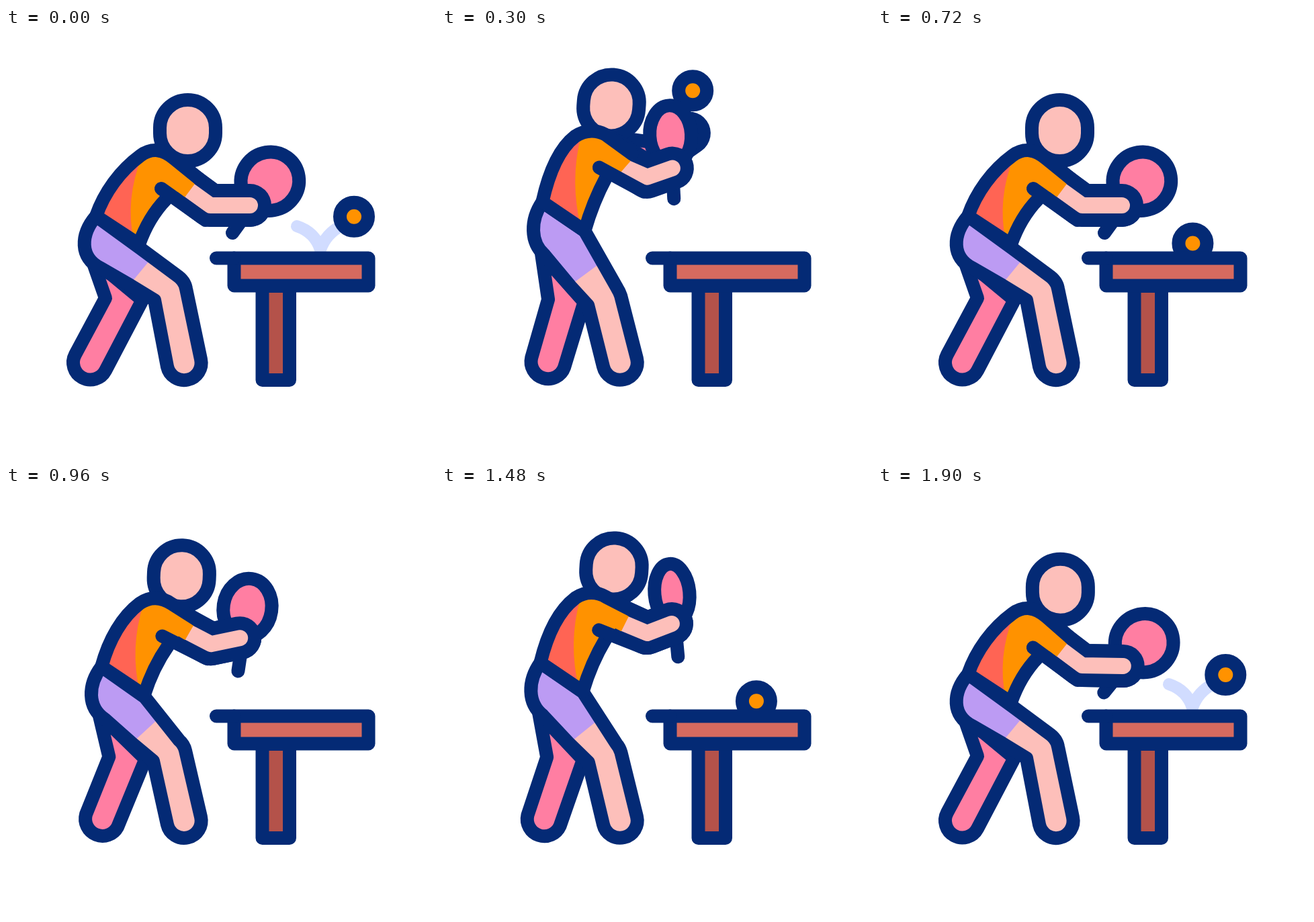
An HTML page with a canvas that plays this animation: 640 by 640 pixels, repeating every 1.92 s.

```html
<!DOCTYPE html>
<html lang="en">
<head>
<meta charset="utf-8">
<title>Table tennis</title>
<style>
html, body { margin: 0; width: 100%; height: 100%; overflow: hidden; background: #fff; }
canvas { display: block; width: 100vmin; height: 100vmin; }
</style>
</head>
<body>
<canvas width="640" height="640"></canvas>
<script>
const c = document.querySelector('canvas').getContext('2d');
const LOOP = 1920;
const NAVY = '#042a75', SKIN = '#fdbfba', PINK = '#ff7ea2', ORANGE = '#ff9200', RED = '#ff6454',
  PURPLE = '#bc9bf3', TABLE = '#d66a5f', LEG = '#b4524a', TRAIL = '#d1dcff';

// Tracks: [time, value]. 0 is the stroke pose, 1 the upright pose.
const BODY = [[0, 0], [300, .95], [400, 1.05], [560, .55], [640, 0], [720, 0], [960, .47], [1080, .9],
  [1160, 1], [1260, 1.08], [1480, .75], [1640, -.03], [1720, -.06], [1900, -.045], [1920, 0]];
const ARM = [[0, 0], [300, .69], [420, 1], [560, .55], [640, 0], [720, 0], [960, .47], [1080, .9],
  [1160, 1], [1260, 1.08], [1480, .74], [1640, -.03], [1720, -.06], [1900, -.05], [1920, 0]];
const FACE = [[0, 33], [300, 21], [420, 17], [560, 26], [640, 33], [720, 33], [960, 26],
  [1160, 17], [1480, 16], [1640, 33], [1920, 33]];
const TOSS = [[0, 0], [120, 0], [300, 1], [400, .9], [560, 0], [1920, 0]];

// Monotone cubic interpolation
function track(keys, t) {
  let i = 0;
  while (i < keys.length - 2 && t >= keys[i + 1][0]) i++;
  const slope = j => j < 0 || j > keys.length - 2 ? 0
    : (keys[j + 1][1] - keys[j][1]) / (keys[j + 1][0] - keys[j][0]);
  const tangent = j => {
    const p = slope(j - 1), q = slope(j);
    return p * q > 0 ? 2 * p * q / (p + q) : 0;
  };
  const [t0, v0] = keys[i], [t1, v1] = keys[i + 1];
  const d = t1 - t0, u = (t - t0) / d, w = 1 - u;
  return v0 * (1 + 2 * u) * w * w + tangent(i) * d * u * w * w
    + v1 * u * u * (3 - 2 * u) - tangent(i + 1) * d * u * u * w;
}

const lerp = (a, b, k) => a + (b - a) * k;
const clamp = v => Math.max(0, Math.min(1, v));
const bow = k => k * (1 - k);
const point = (ax, ay, bx, by, k) => [lerp(ax, bx, k), lerp(ay, by, k)];

// Blends two path strings of equal structure
function morph(a, b, k) {
  const to = b.match(/[\d.]+/g);
  let i = 0;
  return new Path2D(a.replace(/[\d.]+/g, n => ' ' + lerp(+n, +to[i++], k)));
}

function fill(path, color) {
  c.fillStyle = color;
  c.fill(path);
}

function stroke(path, color = NAVY, width = 20, cap = 'round') {
  c.strokeStyle = color;
  c.lineWidth = width;
  c.lineCap = cap;
  c.lineJoin = 'round';
  c.stroke(path);
}

function line(...points) {
  const p = new Path2D();
  points.forEach(q => p.lineTo(...q));
  return p;
}

function outlined(path, color) {
  fill(path, color);
  stroke(path);
}

function curve(x0, y0, x1, y1, x2, y2, u) {
  const w = 1 - u, f = (a, b, d) => a * w * w + 2 * b * u * w + d * u * u;
  return [f(x0, x1, x2), f(y0, y1, y2)];
}

// Ball position and opacity
function ballAt(t) {
  const arc = (x, alpha = 1) => [x, 278 + 43 * ((535 - x) / 67) ** 2, alpha];
  if (t < 140) return arc(518 + 50 * (t / 140) ** 2, clamp((150 - t) / 30));
  if (t < 190) return null;
  if (t < 580) return [368 + 64 * ((t - 190) / 390) ** 2, 65 + .004 * (t - 385) ** 2, 1];
  if (t < 720) return [...curve(432, 217, 460, 245, 468, 321, (t - 580) / 140), 1];
  if (t < 940) return arc(468 + .42 * (t - 720), clamp((950 - t) / 40));
  if (t < 1300) return null;
  if (t < 1480) return arc(468 + .59 * (1480 - t), clamp((t - 1290) / 30));
  if (t < 1620) return [...curve(468, 321, 462, 260, 440, 235, (t - 1480) / 140), 1];
  if (t < 1760) return [...curve(440, 235, 462, 255, 468, 321, (t - 1620) / 140), 1];
  return arc(518 - 50 * (1 - (t - 1760) / 160) ** 2);
}

function drawBall(t) {
  c.globalAlpha = t < 960 ? clamp(1 - t / 120) : clamp((t - 1760) / 110);
  stroke(new Path2D('M433 295Q460 304 468 330Q476 306 500 294'), TRAIL, 18);
  const ball = ballAt(t);
  if (ball) {
    const p = new Path2D();
    p.arc(ball[0], ball[1], 21, 0, 7);
    c.globalAlpha = ball[2];
    outlined(p, ORANGE);
  }
  c.globalAlpha = 1;
}

function drawTable() {
  outlined(new Path2D('M381.5 384H422V524H381.5Z'), LEG);
  outlined(new Path2D('M339.5 342.5H539.5V383.5H339.5Z'), TABLE);
  stroke(line([313, 342.5], [339.5, 342.5]));
}

function drawRacket(a, toss, width) {
  const [x, y] = point(337, 305, 358, 230, a);
  c.save();
  c.translate(x - 6 * bow(a) - 5 * toss, y + 24 * bow(a) - 4 * toss);
  c.rotate((36 - 54 * a - 8 * bow(a)) * Math.PI / 180);
  stroke(line([0, 0], [0, -70]));
  const face = new Path2D();
  face.ellipse(0, -95, width + 10, 44, 0, 0, 7);
  outlined(face, PINK);
  c.restore();
}

function drawLegs(k) {
  outlined(morph(
    'M127 342L148 402L103 486A25.5 25.5 0 0 0 148 510L203 405Z',
    'M149 336L158.5 404L134.5 491A25.5 25.5 0 0 0 183.5 505L212 408Z', k), PINK);
  const leg = morph(
    'M134 280L200 328L254 368Q266 376 268 388L290 493A25.5 25.5 0 0 1 240 504L221 405L185 383L140 357C110 342 110 308 134 280Z',
    'M150 258L213 301L261 388Q264 393 266 399L290 492A25.5 25.5 0 0 1 240 504L217 413L191 384L153 337C132 318 132 285 150 258Z', k);
  fill(leg, SKIN);
  fill(morph(
    'M134 280L200 328L217 342L184 382L140 357C110 342 110 308 134 280Z',
    'M150 258L213 301L238 349L191 383L153 337C132 318 132 285 150 258Z', k), PURPLE);
  stroke(leg);
}

function drawHead(b) {
  c.save();
  c.translate(270.5 - 19.5 * b, 152.5 - 39.5 * b);
  c.rotate(.08 * b);
  const head = new Path2D();
  head.roundRect(-41.5, -45.5, 83, 91, 41.5);
  outlined(head, SKIN);
  c.restore();
}

function draw(t) {
  const b = track(BODY, t), a = track(ARM, t), toss = track(TOSS, t);
  const k = Math.max(0, b + .15 * bow(b));
  const shoulder = point(247, 222, 244, 181, b);
  const sleeve = point(273.5, 242, 272, 192, a);
  const elbow = point(304, 264, 306, 203, a);
  const hand = point(363 - 10 * bow(a), 264, 337 - 10 * bow(a), 184, a);
  const shift = ([x, y], dx, dy) => [x + dx * toss, y + dy * toss];

  c.fillStyle = '#fff';
  c.fillRect(0, 0, 640, 640);
  drawBall(t);
  drawTable();

  const backArm = line(shoulder, shift(elbow, 11, -29), shift(hand, 25, -52));
  stroke(backArm, NAVY, 64);
  stroke(backArm, PINK, 24);
  drawRacket(a, toss, track(FACE, t));
  drawLegs(k);
  drawHead(b);

  stroke(line(shoulder, elbow, hand), NAVY, 64);
  const torso = morph(
    'M238 255Q212 282 198 322L134 280C146 245 170 212 200 190Q225 172 251 195',
    'M245 220Q225 258 213 301L150 258C160 212 176 177 198 160Q220 146 243 157', k);
  torso.lineTo(...point(288, 225, 281, 171, a));
  fill(torso, ORANGE);
  fill(morph(
    'M134 280C146 245 170 212 200 190L202 192Q177 255 190 316Z',
    'M150 258C160 212 176 177 198 160L207 160Q190 228 208 298Z', k), RED);
  stroke(line(sleeve, elbow, hand), SKIN, 24);
  stroke(line(shoulder, sleeve), ORANGE, 25, 'butt');
  stroke(torso);
  stroke(line(point(231, 239, 234, 206, b), point(297, 286, 302, 225, a)));
}

function frame(now) {
  draw(now % LOOP);
  requestAnimationFrame(frame);
}
requestAnimationFrame(frame);
</script>
</body>
</html>
```
